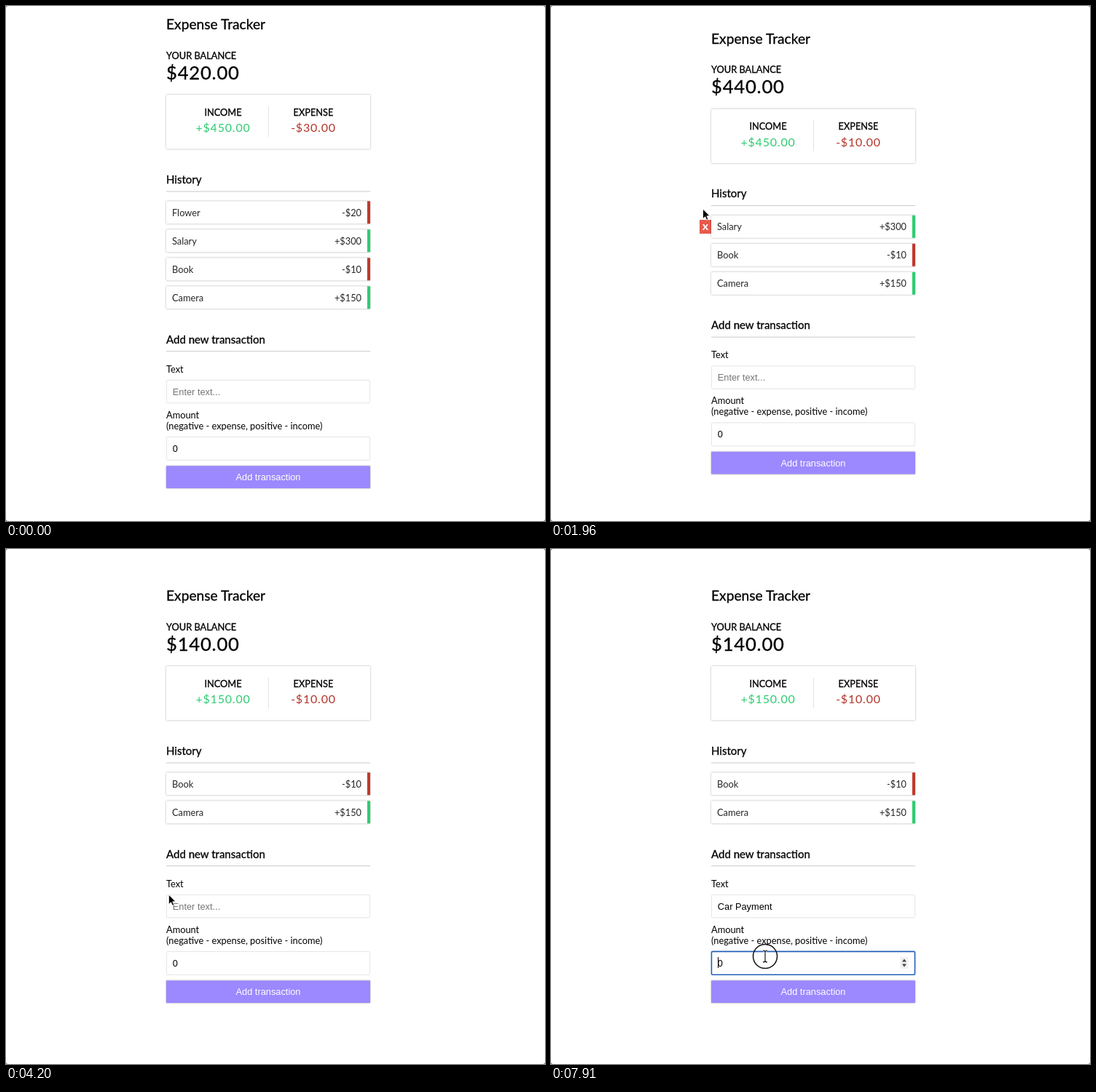
Write an HTML page that moves like this. It is 740 by 708 pixels and loops after 8000 ms.

```html
<!DOCTYPE html>
<html lang="en">
<head>
<meta charset="utf-8">
<title>Expense Tracker</title>
<style>
  html, body { margin: 0; width: 100%; height: 100%; overflow: hidden; background: #777; }
  svg { display: block; width: 740px; height: 708px; background: #fff; border-radius: 3px; }
  text { font: 12.8px Lato, sans-serif; white-space: pre; }
  .bold { stroke: #000; stroke-width: .3; }
  .h2 { font-size: 19.2px; }
  .h3 { font-size: 15px; }
  .total { font-size: 25.6px; letter-spacing: .8px; }
  .money { font-size: 16px; letter-spacing: .8px; }
  .mid { text-anchor: middle; }
  .ui { font-family: "Liberation Sans", Arial, sans-serif; }
  .card { fill: #fff; filter: drop-shadow(0 .8px 1.2px rgba(0,0,0,.12)) drop-shadow(0 .8px .8px rgba(0,0,0,.24)); }
  .rule { stroke: #bbb; stroke-width: .8; }
  .field { fill: #fff; stroke: #dedede; stroke-width: .8; }
  .field.on { stroke: #2560b8; stroke-width: 1.6; }
  .row text { fill: #262626; }
</style>
</head>
<body>
<svg viewBox="0 0 740 708">
  <g id="head">
    <text class="bold h2" x="220" y="32">Expense Tracker</text>
    <text class="bold" x="220" y="72.6">YOUR BALANCE</text>
    <text class="bold total" id="total" x="220" y="100.5"></text>
    <rect class="card" x="220" y="122" width="280" height="74.5"/>
    <path d="M360.5 138v42" stroke="#dedede" stroke-width=".8"/>
    <text class="bold mid" x="298" y="150.6">INCOME</text>
    <text class="money mid" id="income" x="298" y="173.2" fill="#2ecc71"></text>
    <text class="bold mid" x="422" y="150.6">EXPENSE</text>
    <text class="money mid" id="spent" x="422" y="173.2" fill="#b3342a"></text>
    <text class="bold h3" x="220" y="243.5">History</text>
    <path class="rule" d="M220 255h280"/>
  </g>
  <g id="del">
    <rect x="204" y="6.2" width="16" height="19" fill="#e74c3c"/>
    <text class="mid" x="212" y="20.3" fill="#fff" style="font-size:16px;font-weight:700">x</text>
  </g>
  <g id="rows"></g>
  <g id="form">
    <text class="bold h3" x="220" y="463.5">Add new transaction</text>
    <path class="rule" d="M220 474.7h280"/>
    <text x="220" y="503.6">Text</text>
    <rect class="field" id="field1" x="220.4" y="514.4" width="279.2" height="31.4" rx="1.6"/>
    <text class="ui" id="entry" x="228.8" y="534.5"></text>
    <text x="220" y="566.6">Amount</text>
    <text x="220" y="581.6">(negative - expense, positive - income)</text>
    <rect class="field" id="field2" x="220.4" y="592.4" width="279.2" height="31.9" rx="1.6"/>
    <text class="ui" x="228.8" y="612.6">0</text>
    <g id="spin">
      <rect x="479.5" y="600" width="11" height="16" rx="1" fill="#f1f1f1"/>
      <path d="M482 606.5l3-4 3 4zM482 609.5l3 4 3-4z" fill="#444"/>
    </g>
    <rect id="caret" width="1"/>
    <rect class="card" x="220" y="632.3" width="280" height="30.7" style="fill:#9c88ff"/>
    <text class="ui mid" x="360" y="652" fill="#fff">Add transaction</text>
  </g>
  <g id="cursor">
    <path id="arrow" d="M0 0V13.5L3.1 10.7 5.2 15.2 7.4 14.2 5.4 9.8H9.7Z" stroke="#fff" stroke-width=".9"/>
    <g id="hand" fill="#fff" stroke="#000" stroke-linejoin="round">
      <path d="M-3.5 8V.5a1.5 1.5 0 0 1 3 0V6c0-1.2 2.6-1.2 2.6.4c.2-1.1 2.6-1 2.6.5c.3-1 2.3-.8 2.3.9V11c0 3-1.3 3.6-1.5 6H-2.5c-.3-2-2-3.5-4-6.3c-1-1.5.8-2.8 2-1.6z"/>
      <path d="M-.3 11v3.5M1.8 11v3.5M3.9 11v3.5" stroke-width=".8"/>
    </g>
    <g id="beam" fill="none">
      <path id="stem" d="M-3-8q3 0 3 2V6q0 2-3 2M3-8q-3 0-3 2M3 8q-3 0-3-2" stroke="#fff" stroke-width="2.6"/>
      <use href="#stem" style="filter:brightness(0)"/>
      <path d="M-3-8q3 0 3 2V6q0 2-3 2M3-8q-3 0-3 2M3 8q-3 0-3-2" stroke="#000" stroke-width="1.1"/>
    </g>
    <circle id="ring" r="16.5" fill="none" stroke="#111" stroke-width="1.5"/>
  </g>
</svg>
<script>
const LOOP = 8000, WORD = 'Car Payment';
const $ = id => document.getElementById(id);
const set = (el, attrs) => { for (const k in attrs) el.setAttribute(k, attrs[k]); };
const show = (id, on) => { $(id).style.display = on ? '' : 'none'; };
const move = (el, x, y) => set(el, { transform: `translate(${x} ${y})` });
const within = (t, a, b) => t >= a && t < b;
const ramp = (t, start) => {
  const k = Math.min(1, Math.max(0, (t - start) / 300));
  return k * k * (3 - 2 * k);
};

const items = [['Flower', -20], ['Salary', 300], ['Book', -10], ['Camera', 150]];
const deletes = [1820, 3360];
const keys = [5110, 5250, 5320, 5460, 5740, 5880, 6090, 6440, 6580, 6690, 6710];
const focusText = 4550, focusAmount = 7840;
const path = [
  [700, 148, 300], [840, 206, 281], [910, 208.5, 279], [2520, 208.5, 279], [2730, 211, 300],
  [3920, 211, 300], [4060, 133, 390], [4200, 223, 475], [4410, 294, 485],
  [7420, 294, 485], [7700, 294, 560]
];

const signed = n => (n < 0 ? '-$' : '+$') + Math.abs(n);
$('rows').innerHTML = items.map(([name, sum]) => `<g class="row">
  <rect class="card" x="220" width="280" height="31"/>
  <rect x="496" width="4" height="31" fill="${sum < 0 ? '#c0392b' : '#2ecc71'}"/>
  <text x="228" y="20.7">${name}</text>
  <text x="488" y="20.7" text-anchor="end">${signed(sum)}</text></g>`).join('');
const rows = [...$('rows').children];
$('stem').nextElementSibling.remove();

function pointer(t) {
  const i = path.findIndex(p => p[0] > t);
  if (i < 0) return path[path.length - 1].slice(1);
  if (i === 0) return path[0].slice(1);
  const [t0, x0, y0] = path[i - 1], [t1, x1, y1] = path[i];
  const k = (t - t0) / (t1 - t0);
  return [x0 + (x1 - x0) * k, y0 + (y1 - y0) * k];
}

function drawList(t) {
  const gone = deletes.filter(d => t >= d).length, shift = 19.5 * gone;
  const sums = items.slice(gone).map(item => item[1]);
  const add = list => list.reduce((a, b) => a + b, 0);
  $('total').textContent = `$${add(sums)}.00`;
  $('income').textContent = signed(add(sums.filter(s => s > 0))) + '.00';
  $('spent').textContent = signed(add(sums.filter(s => s < 0))) + '.00';
  move($('head'), 0, shift);
  move($('form'), 0, -shift);
  rows.forEach((row, i) => {
    row.style.display = i < gone ? 'none' : '';
    move(row, 0, 268.3 + shift + 39 * (i - gone));
  });
  move($('del'), 0, 268.3 + shift);
  $('del').style.opacity = ramp(t, 760) - ramp(t, 1910) + ramp(t, 2560) - ramp(t, 3470);
}

function drawForm(t) {
  const typed = WORD.slice(0, keys.filter(k => t >= k).length);
  const inText = within(t, focusText, focusAmount), inAmount = t >= focusAmount;
  const entry = $('entry');
  entry.textContent = typed || 'Enter text...';
  set(entry, { fill: typed ? '#000' : '#757575' });
  $('field1').classList.toggle('on', inText);
  $('field2').classList.toggle('on', inAmount);
  show('spin', inAmount);
  const last = Math.max(...[focusText, ...keys, focusAmount].filter(k => k <= t));
  show('caret', (inText || inAmount) && (t - last) % 1000 < 500);
  const width = typed && inText ? entry.getComputedTextLength() : 0;
  set($('caret'), inAmount ? { x: 229, y: 600, height: 15 } : { x: 228.6 + width, y: 523, height: 14 });
}

function drawCursor(t) {
  const [x, y] = pointer(t);
  const hand = within(t, 800, 1890) || within(t, 2590, 3430);
  const beam = t > 4000 && x > 220 && (within(y, 476, 507) || within(y, 553, 585));
  move($('cursor'), x, y);
  show('cursor', within(t, 700, keys[0]) || t >= 7420);
  show('hand', hand);
  show('beam', beam);
  show('arrow', !hand && !beam);
  show('ring', within(t, focusText, 4690) || t >= focusAmount);
}

function frame(now) {
  const t = now % LOOP;
  drawList(t);
  drawForm(t);
  drawCursor(t);
  requestAnimationFrame(frame);
}
frame(0);
requestAnimationFrame(frame);
</script>
</body>
</html>
```
